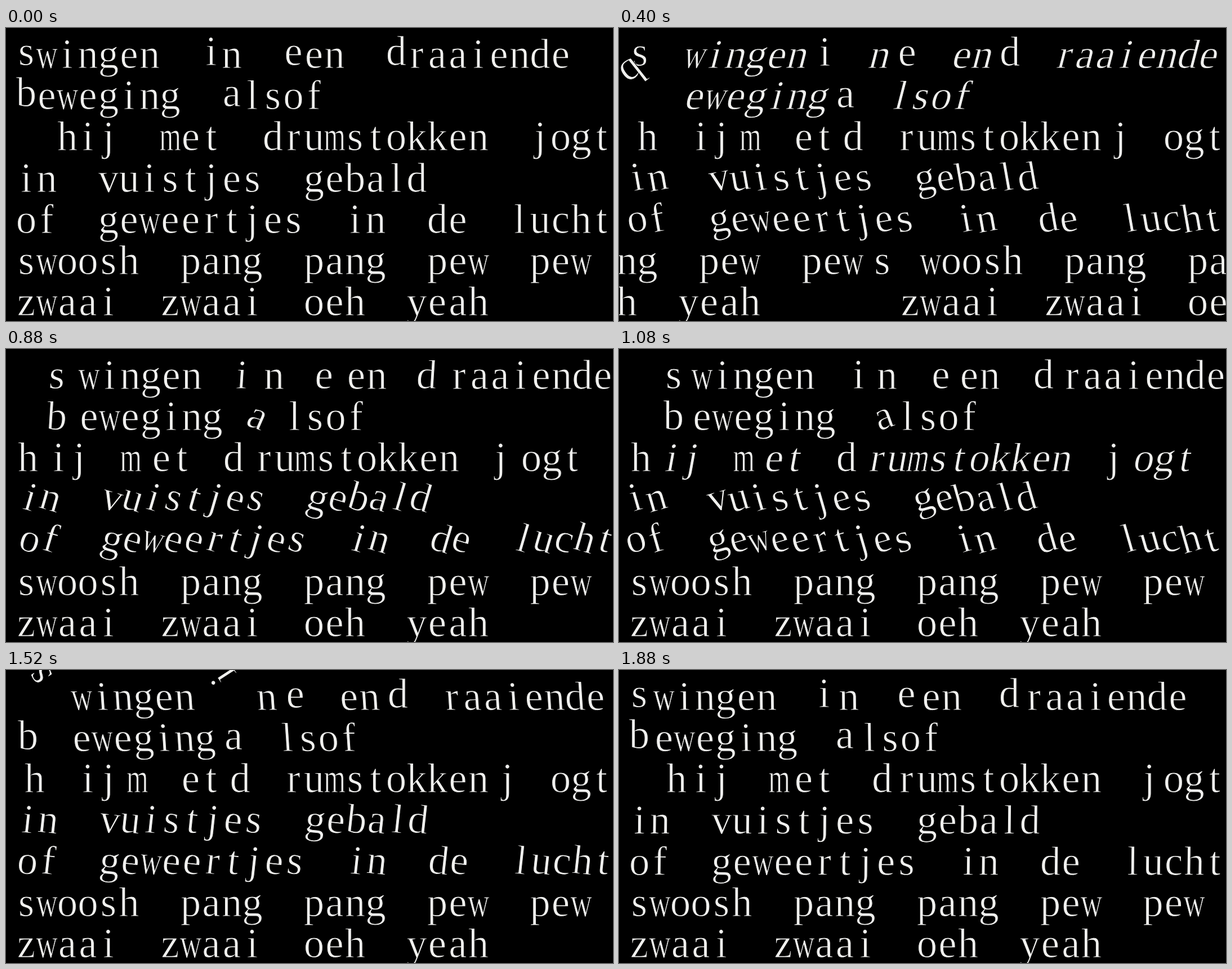
These frames come from a looping animation (1078 by 520 pixels, 1920 ms). An HTML page:

```html
<!DOCTYPE html>
<html lang="nl">
<head>
<meta charset="utf-8">
<title>Zwaai</title>
<style>
  html, body { margin: 0; width: 100%; height: 100%; overflow: hidden; background: #000; }
  svg { display: block; width: 1078px; height: 520px; }
  text {
    font: 73px "Liberation Serif", "Noto Serif", serif;
    text-anchor: middle;
    fill: #f0f0ee;
    stroke: #000;
    stroke-width: 1.1px;
  }
</style>
</head>
<body>
<svg id="stage" viewBox="0 0 1078 520"></svg>
<script>
const LOOP = 1920, STEP = 40;
const PITCH = 36.5, LEFT = 36, ROW = 73.2, BASE = 71;
const MIDDLE = 18;   // centre of a letter above its baseline
const RADIUS = 27;   // orbit of the spinning initials
const SPIN_TIME = 280;
const WRAP = 1087, EDGE = 15;

const lines = [
  "swingen  in  een  draaiende",
  "beweging  alsof",
  "  hij  met  drumstokken  jogt",
  "in  vuistjes  gebald",
  "of  geweertjes  in  de  lucht",
  "swoosh  pang  pang  pew  pew",
  "zwaai  zwaai  oeh  yeah"
];

// When each initial starts its turn, and when it turns back.
const spinStart = { b: 280, s: 400, i: 400, e: 500, d: 600, a: 840 };
const spinBack = letter => "si".includes(letter) ? 1410 : 1240;

const progress = (from, to, t) => Math.min(1, Math.max(0, (t - from) / (to - from)));
const bump = (from, to, t) => Math.sin(Math.PI * progress(from, to, t));
const wave = (period, peak, t) => Math.cos(2 * Math.PI * (t - peak) / period);

function smooth(from, to, t) {
  const u = progress(from, to, t);
  return u * u * (3 - 2 * u);
}

// Eases out to 1, rests there and returns the same way.
const glide = t => Math.sin(Math.PI / 2 * progress(0, 640, Math.min(t, LOOP - t)));

function orbit({ char }, t) {
  const start = spinStart[char], back = spinBack(char);
  const turns = smooth(start, start + SPIN_TIME, t) - smooth(back, back + SPIN_TIME, t);
  const angle = 2 * Math.PI * turns;
  const drift = 64 * smooth(340, 1060, t) * (1 - smooth(1000, 1600, t));
  return {
    x: drift - RADIUS * Math.sin(angle),
    y: RADIUS * (Math.cos(angle) - 1) - 3 - 2 * wave(LOOP, 0, t),
    turn: 360 * turns,
    lean: 8 * bump(440, 960, t)
  };
}

function slide(t) {
  return {
    x: 75 * glide(t),
    lean: 15 * bump(0, 680, t) - 4 * bump(1240, LOOP, t)
  };
}

function jog({ head }, t) {
  if (head) return { x: -70 * glide(t) };
  return {
    x: -53 * smooth(400, 920, t) * (1 - smooth(1060, 1380, t)),
    lean: 13 * bump(900, 1520, t)
  };
}

function swing(t) {
  const turn = -27 * bump(0, LOOP, t) * wave(LOOP / 2, 260, t);
  return { x: 0.35 * turn, y: -0.25 * Math.abs(turn), turn };
}

function scroll({ row, col, homeX }, t) {
  const lag = row === 5 && col === 0 ? 28 : 0;
  const travelled = homeX + WRAP * smooth(160 + lag, 680, t);
  return { x: (travelled + EDGE) % WRAP - EDGE - homeX };
}

function poseOf(letter, t) {
  if (letter.row < 2) return letter.head ? orbit(letter, t) : slide(t);
  if (letter.row === 2) return jog(letter, t);
  return letter.row < 5 ? swing(t) : scroll(letter, t);
}

const stage = document.getElementById("stage");
const letters = [];
lines.forEach((line, row) => [...line].forEach((char, col) => {
  if (char === " ") return;
  const node = document.createElementNS(stage.namespaceURI, "text");
  node.textContent = char;
  node.setAttribute("y", MIDDLE);
  stage.append(node);
  letters.push({
    char, row, col, node,
    head: col === 0 || line[col - 1] === " ",
    homeX: LEFT + col * PITCH,
    homeY: BASE + row * ROW - MIDDLE,
    fit: Math.min(1, 1.06 * PITCH / node.getComputedTextLength())
  });
}));

function draw(now) {
  const t = Math.floor(now % LOOP / STEP) * STEP;
  for (const letter of letters) {
    const { x = 0, y = 0, turn = 0, lean = 0 } = poseOf(letter, t);
    letter.node.setAttribute("transform",
      `translate(${letter.homeX + x} ${letter.homeY + y}) rotate(${turn}) skewX(${-lean}) scale(${letter.fit} 1)`);
  }
}

const start = performance.now();
function frame() {
  draw(performance.now() - start);
  requestAnimationFrame(frame);
}
frame();
</script>
</body>
</html>
```
